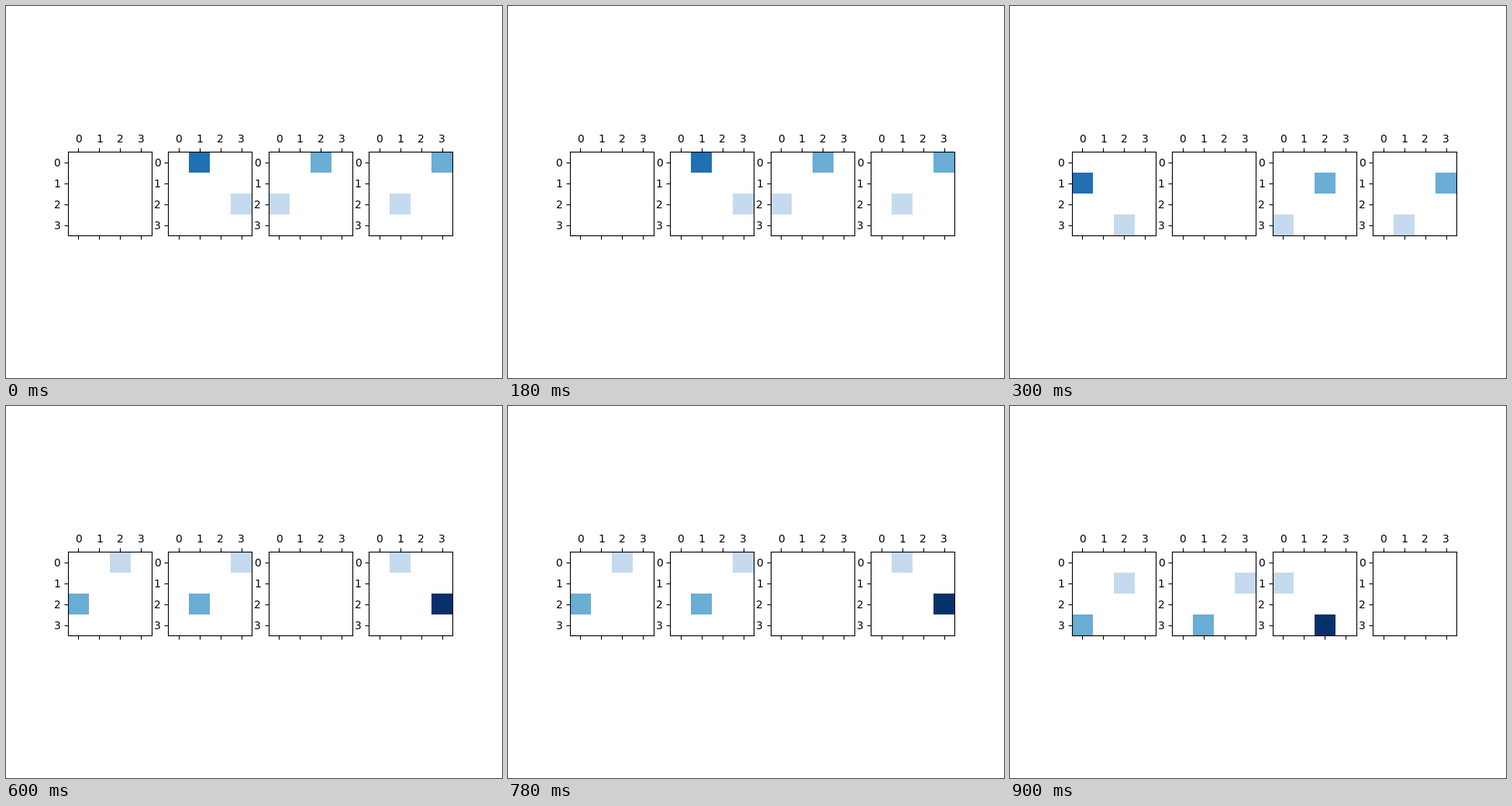
These frames come from a looping animation (640 by 480 pixels, 1200 ms). A matplotlib script:

```python
import numpy as np
import matplotlib.pyplot as plt
from matplotlib.animation import FuncAnimation

N = 4
STRONG = {(0, 1): 0.75, (2, 3): 1.0}


def transition(row, col):
    """Grid with a main cell at (row, col) and a faint one half a turn away."""
    grid = np.full((N, N), np.nan)
    if row != col:
        pair = tuple(sorted((row, col)))
        grid[row, col] = STRONG.get(pair, 0.5)
        grid[(row + 2) % N, (col + 2) % N] = 0.25
    return np.ma.masked_invalid(grid)


fig, axes = plt.subplots(1, N, figsize=(6.4, 4.8), dpi=100)
images = [
    ax.matshow(transition(0, col), cmap="Blues", vmin=0, vmax=1)
    for col, ax in enumerate(axes)
]


def update(row):
    for col, image in enumerate(images):
        image.set_data(transition(row, col))
    return images


anim = FuncAnimation(fig, update, frames=N, interval=300,
                     repeat=True, repeat_delay=0)
plt.show()
```
